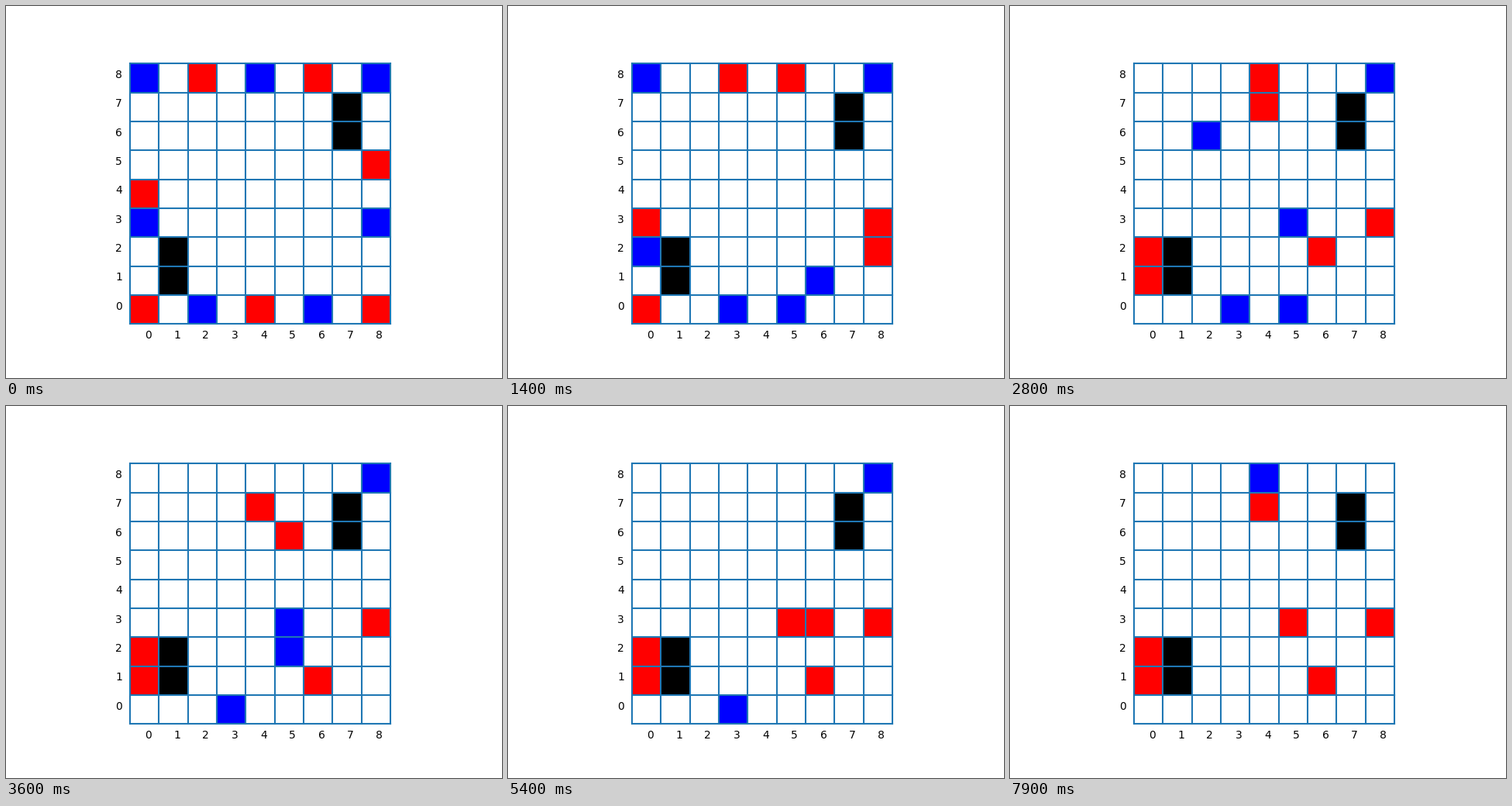
These frames come from a looping animation (640 px wide and 480 px high, 8 s). A matplotlib script:

```python
import matplotlib.pyplot as plt
from matplotlib.animation import FuncAnimation
from matplotlib.patches import Rectangle

SIZE = 9
FRAMES = 80
STEP = {"L": (-1, 0), "R": (1, 0), "U": (0, 1), "D": (0, -1)}

START = {
    "blue": [(0, 8), (4, 8), (8, 8), (8, 3), (0, 3), (2, 0), (6, 0)],
    "red": [(2, 8), (6, 8), (8, 5), (0, 4), (0, 0), (4, 0), (8, 0)],
    "black": [(1, 1), (1, 2), (7, 6), (7, 7)],
}

# Each run: the cell of a piece and its steps, one per turn of that side.
BLUE_RUNS = [
    ((2, 0), "R"), ((6, 0), "L"), ((8, 3), "L"), ((0, 3), "D"),
    ((7, 3), "LDDLUU"), ((0, 8), "DDRR"), ((5, 0), "UU"), ((2, 6), "RR"),
    ((5, 2), "DUDUDUDUR"), ((8, 8), "LL"), ((3, 0), "RUR"),
    ((6, 8), "DULLLRLR"),
]
RED_RUNS = [
    ((8, 5), "D"), ((8, 0), "U"), ((8, 4), "D"), ((0, 4), "D"),
    ((8, 1), "U"), ((2, 8), "R"), ((6, 8), "LLD"), ((0, 0), "U"),
    ((0, 3), "D"), ((3, 8), "R"), ((8, 2), "LL"), ((6, 2), "D"),
    ((4, 7), "R"), ((4, 8), "D"), ((5, 7), "D"), ((4, 7), "DDDD"),
    ((5, 6), "DDR"), ((4, 3), "R"), ((6, 4), "D"), ((5, 3), "UUL"),
    ((6, 3), "LD"), ((4, 5), "UUDU"), ((5, 2), "DUU"),
]


def moves(runs):
    for (x, y), steps in runs:
        for s in steps:
            dx, dy = STEP[s]
            yield (x, y), (x + dx, y + dy)
            x, y = x + dx, y + dy


def around(cell):
    return [(cell[0] + dx, cell[1] + dy) for dx, dy in STEP.values()]


def play(board, old, new):
    """Move a piece; a foe touching two pieces of its side is taken."""
    board = dict(board)
    side = board.pop(old)
    board[new] = side
    foe = "red" if side == "blue" else "blue"
    for cell in around(new):
        if board.get(cell) == foe:
            if sum(board.get(n) == side for n in around(cell)) >= 2:
                del board[cell]
    return board


boards = [{cell: side for side, cells in START.items() for cell in cells}]
turns = [moves(BLUE_RUNS), moves(RED_RUNS)]
for t in range(FRAMES - 1):
    boards.append(play(boards[-1], *next(turns[t % 2])))

fig, ax = plt.subplots(figsize=(6.4, 4.8), dpi=100)
ax.set_aspect("equal")
ax.axis("off")

cells = {}
for x in range(SIZE):
    for y in range(SIZE):
        cells[x, y] = ax.add_patch(
            Rectangle((x, y), 1, 1, facecolor="white", edgecolor="none"))

for i in range(SIZE + 1):
    ax.plot([0, SIZE], [i, i], color="tab:blue", lw=1.5)
    ax.plot([i, i], [0, SIZE], color="tab:blue", lw=1.5)

for i in range(SIZE):
    for pos in ((i + 0.5, -0.5), (-0.5, i + 0.5)):
        ax.text(*pos, str(i), fontsize=10, family="DejaVu Sans")

ax.set_xlim(-0.45, SIZE + 0.45)
ax.set_ylim(-0.45, SIZE + 0.45)


def draw(frame):
    for cell, patch in cells.items():
        patch.set_facecolor(boards[frame].get(cell, "white"))
    return list(cells.values())


anim = FuncAnimation(fig, draw, frames=FRAMES, interval=100,
                     repeat=True, repeat_delay=0)
plt.show()
```
